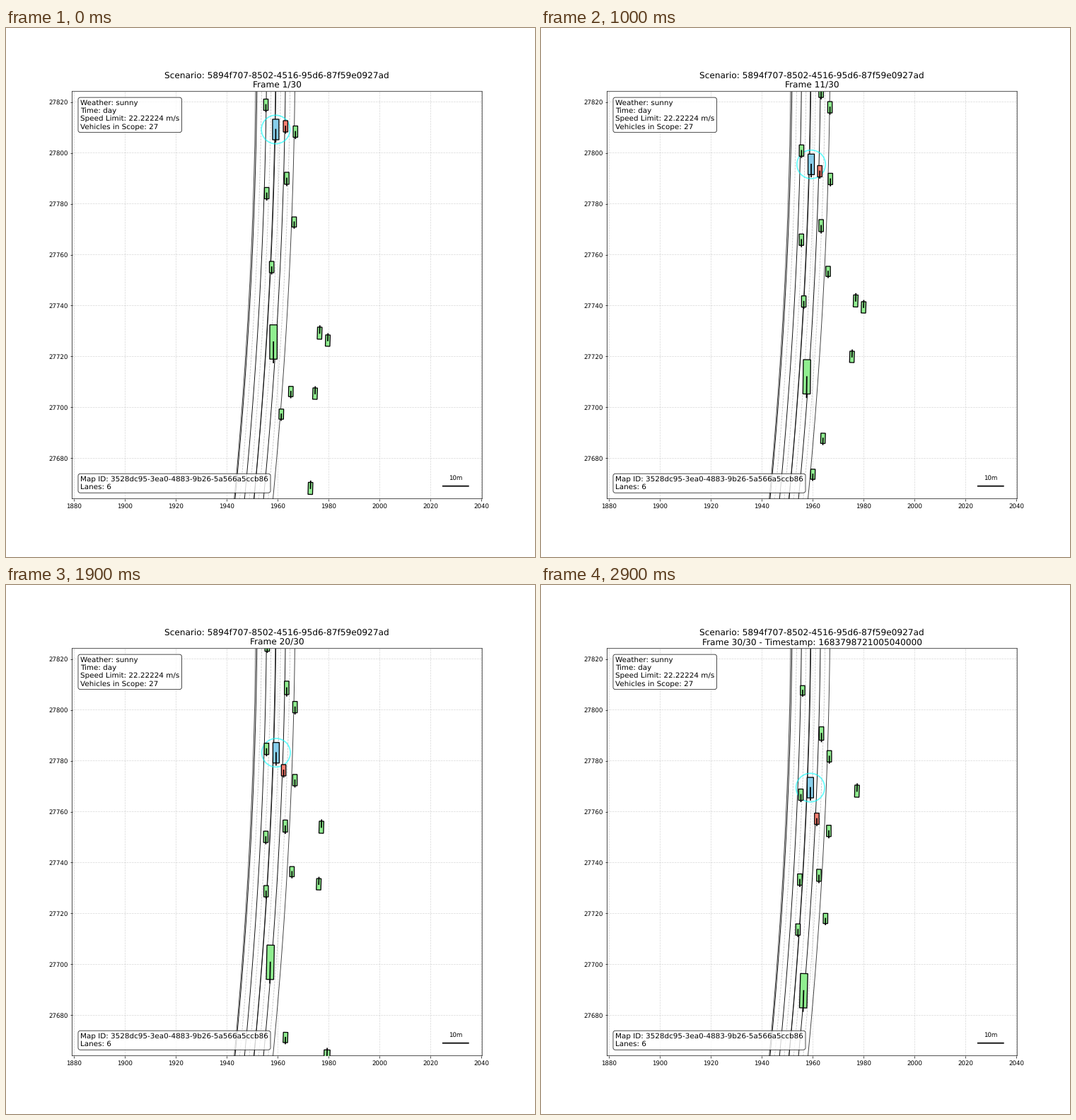
Animation, 748 px wide and 748 px high, one loop 3000 ms. Source, as a matplotlib script:

```python
import numpy as np
import matplotlib.pyplot as plt
from matplotlib.animation import FuncAnimation
from matplotlib.patches import Circle, Polygon

SIZE = 748
FRAMES = 30
SCALE = 3.6  # pixels per metre
TITLE = "Scenario: 5894f707-8502-4516-95d6-87f59e0927ad\nFrame {}/{}"
STAMP = " - Timestamp: 1683798721005040000"

# Soft, unsnapped edges keep small parts at their true places
plt.rcParams.update({"path.snap": False, "text.hinting": "no_hinting"})


def world(px, py):
    """Stage pixels to map metres."""
    return (1880 + (np.asarray(px) - 96.4) / SCALE,
            27820 - (np.asarray(py) - 104.5) / SCALE)


fig, ax = plt.subplots(figsize=(12, 12), dpi=SIZE / 12)
ax.set_xlim(1879.2, 2040.23)
ax.set_ylim(27664.1, 27824.1)
ax.set_xticks(range(1880, 2041, 20))
ax.set_yticks(range(27680, 27821, 20))
ax.ticklabel_format(useOffset=False, style="plain")
ax.grid(True, linestyle="--", alpha=0.5)


def lane_line(top, shift=30.9, **style):
    """A road line that bends left by shift on its way down."""
    t = np.linspace(0, 1, 80)
    bend = 0.21 * t + 0.79 * t ** 2
    ax.plot(*world(top - shift * bend, 90 + 576 * t), zorder=2, **style)


for k in range(5):
    top = 354.8 + 13.4 * k
    lane_line(top, color="black", lw=1.1, alpha=0.75 if k == 4 else 0.95)
    if k < 4:
        lane_line(top + 6.6, color="gray", lw=0.9, ls="--", alpha=0.5)
lane_line(353, 30.3, color="black", lw=1.1, alpha=0.75)  # road's outer edge
lane_line(380.8, 30.2, color="black", lw=1.1, alpha=0.75)  # carriageway seam

# Scale bar
ax.plot([2024.85, 2034.85], [27669.1] * 2, color="black", lw=2)
ax.text(2029.85, 27671.1, "10m", ha="center", va="bottom", fontsize=10)

box = dict(boxstyle="round", facecolor="white", alpha=0.8)
ax.text(0.02, 0.98, "Weather: sunny\nTime: day\n"
        "Speed Limit: 22.22224 m/s\nVehicles in Scope: 27",
        transform=ax.transAxes, va="top", fontsize=12, bbox=box, zorder=10)
ax.text(0.02, 0.02, "Map ID: 3528dc95-3ea0-4883-9b26-5a566a5ccb86\nLanes: 6",
        transform=ax.transAxes, va="bottom", fontsize=12, bbox=box, zorder=10)
title = ax.set_title("", fontsize=14)


class Vehicle:
    """A box driving from start to end (pixels) over the loop.

    lead is how far below an even pace it is at half time."""

    def __init__(self, start, end, lead=0, length=16, width=6.4,
                 color="lightgreen", last=FRAMES):
        self.start, self.end = np.array(start), np.array(end)
        self.length, self.width, self.last = length, width, last
        self.north = end[1] < start[1]
        # The road curves most near the top, so paths there bow to the right
        bow = max(0, 1.8 - (start[1] + end[1]) / 500)
        self.arc = np.array([bow, lead])
        self.body = ax.add_patch(Polygon(np.zeros((4, 2)), facecolor=color,
                                         edgecolor="black", lw=1.5, zorder=5))
        self.nose, = ax.plot([], [], color="black", lw=2, zorder=6)

    def at(self, i):
        u = i / (FRAMES - 1)
        return self.start + (self.end - self.start) * u + self.arc * 4 * u * (1 - u)

    def draw(self, i):
        x, y = self.at(i)
        tilt = 0.03 if self.north else np.clip((y - 430) / 5000, 0, 0.03)
        w, h = self.width / 2, self.length / 2
        dx = np.array([-w, w, w, -w])
        dy = np.array([-h, -h, h, h])
        self.body.set_xy(np.column_stack(
            world(x + dx - tilt * dy, y + dy + tilt * dx)))
        reach = self.length * (-0.6 if self.north else 0.6)
        self.nose.set_data(*world([x, x - tilt * reach], [y, y + reach]))
        for part in (self.body, self.nose):
            part.set_visible(i <= self.last)


ego = Vehicle((381.4, 143.5), (380.9, 286.5), length=29, width=9, color="skyblue")
truck = Vehicle((378.2, 444), (371.4, 573.7), 5, length=48.5, width=10.4)
southbound = [
    Vehicle((395.3, 139), (390, 330.5), -2.8, color="salmon"),
    Vehicle((367.5, 108.5), (367.5, 296.5)),
    Vehicle((409.3, 146.5), (407, 347.7), -2.7),
    Vehicle((397, 212.5), (393, 410.5), -1.5, length=17),
    Vehicle((368.7, 233.5), (366, 416.5), 3),
    Vehicle((407.5, 274.3), (402.3, 471.5), 2, length=14.3),
    Vehicle((375.7, 338), (363.4, 487.2), -3),
    Vehicle((402.8, 514), (391.2, 706), length=14.5),
    Vehicle((389.3, 546), (375.2, 792.5), length=14.3),
    # Entering from the top
    Vehicle((407.4, 47), (407.7, 242.2), -2.5),
    Vehicle((394, 27), (396.6, 210), -1.6, length=19),
    Vehicle((364, -30.7), (370, 149), length=13.4),
]
northbound = [
    Vehicle((443.5, 431.5), (446.8, 291.5), 3, length=17),
    Vehicle((455, 442), (457.5, 305.7), last=10),
    Vehicle((437, 517), (445, 382), -6, last=25),
    Vehicle((430.5, 651), (434, 506), length=17, last=1),
    Vehicle((446.2, 701.6), (457.8, 649.4), length=20, width=8.4, last=25),
]
vehicles = [ego, truck] + southbound + northbound
ring = ax.add_patch(Circle((0, 0), 20.2 / SCALE, fill=False, edgecolor="cyan",
                           lw=2, alpha=0.6, zorder=4))


def update(i):
    title.set_text(TITLE.format(i + 1, FRAMES) + (STAMP if i == FRAMES - 1 else ""))
    for vehicle in vehicles:
        vehicle.draw(i)
    ring.set_center(world(*ego.at(i)))
    return [title, ring]


anim = FuncAnimation(fig, update, frames=FRAMES, interval=100, repeat=True,
                     repeat_delay=0, blit=False)
plt.show()
```
